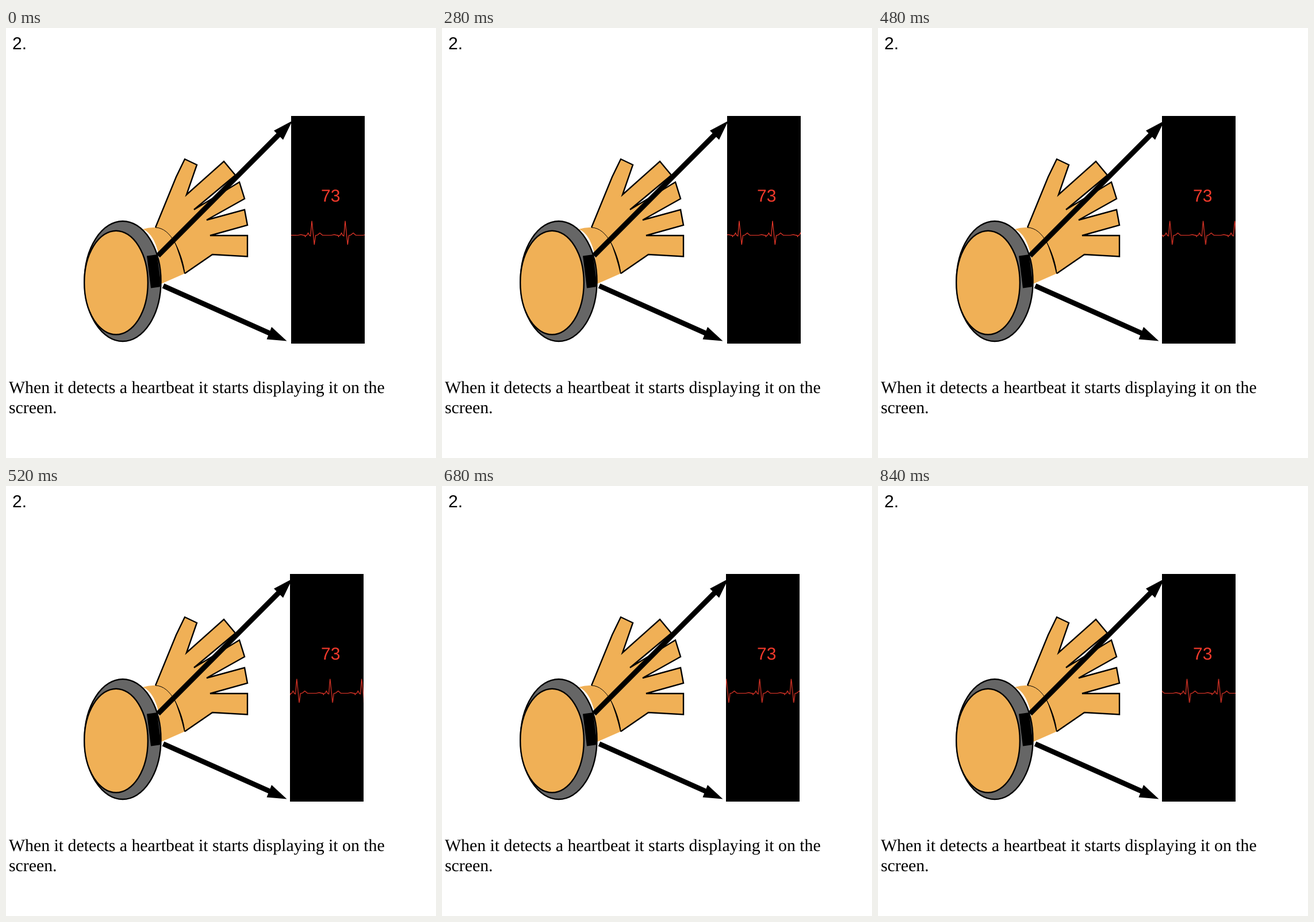
Animation, 748 px wide and 748 px high, one loop 880 ms. Source, as an HTML page:

```html
<!DOCTYPE html>
<html lang="en">
<head>
<meta charset="utf-8">
<title>Heartbeat display</title>
<style>
  html, body { margin: 0; width: 100%; height: 100%; overflow: hidden; background: #fff; }
  svg { display: block; width: 100vw; height: 100vh; }
  text { text-rendering: geometricPrecision; }
  .sans { font: 30px "Liberation Sans", Arial, sans-serif; }
  .serif { font: 29.8px "Liberation Serif", Times, serif; }
  .skin { fill: #f0b056; }
  .ink { stroke: #000; stroke-width: 2.4; }
  .red { fill: #f0392b; }
  .trace { fill: none; stroke: #f0392b; stroke-width: 1.2; }

  /* A tiny negative delay keeps the 40 ms steps clear of rounding. */
  .panel { animation: nudge 880ms -1ms step-end infinite; }
  .trace { animation: scroll 880ms -1ms step-end infinite; }

  @keyframes nudge {
    0% { transform: translateX(0); }
    54.5455% { transform: translateX(-2px); }
  }
  /* One unit (1.875px) per step, then two. */
  @keyframes scroll {
    0% { transform: translateX(0); }
    4.5455% { transform: translateX(-3.75px); animation-timing-function: steps(14); }
    68.1818% { transform: translateX(-30px); animation-timing-function: steps(7); }
    100% { transform: translateX(-56.25px); }
  }
</style>
</head>
<body>
<svg viewBox="0 0 748 748">
  <defs>
    <clipPath id="screen"><rect class="panel" x="496" y="153" width="128" height="396"/></clipPath>
    <path id="beat" d="M-28 360.5 H-24 L-19 359.3 L-14 360.7 L-12.5 360.5 L-11.5 363 L-10 360.5 H-8.5 L-6.5 356.5 L-4 361 L-2.3 361.8 L0 335.5 L4.3 377 L6.5 361 L10 360 L14 356.5 L18.5 360.5 H30"/>
  </defs>

  <text class="sans" x="11" y="37">2.</text>

  <g class="skin">
    <path d="M238 350 Q250 346.500 260 347 L290 350 L311 427 L270 445 L266 396 Q258 358 238 350Z"/>
    <path d="M260 347 L296 259 L311 228 L332 238 L314 290 L379 232 L399 256 L327 316 L406 268 L415 297 L349 334 L415 316 L420 343 L355 361 H420 V397.500 L359 394 L311 427 C304 388 288 348 260 347Z"/>
  </g>
  <path class="ink" fill="none" d="M260 347 L296 259 L311 228 L332 238 L314 290 L379 232 L399 256 L327 316 L406 268 L415 297 L349 334 L415 316 L420 343 L355 361 H420 V397.500 L359 394 L311 427"/>
  <path fill="none" stroke="#000" d="M311 427 C304 388 288 348 260 347"/>
  <path d="M311.500 428 Q309 400 291 367 Q303 396 310 427Z"/>

  <ellipse class="ink" cx="203" cy="440.500" rx="66.500" ry="104.500" fill="#666"/>
  <ellipse class="skin ink" cx="191.500" cy="443" rx="55.300" ry="90.300"/>
  <path d="M245 396.500 L263 394 L270 450 L252 452.500Z"/>

  <path stroke="#000" stroke-width="9" d="M264.500 396 L476 184 M273.500 448.500 L462 532.500"/>
  <path d="M498 161.500 L466 178.500 L482 194.500Z M488.500 544.500 L462 520 L453.500 541.500Z"/>

  <rect class="panel" x="496" y="153" width="128" height="396"/>
  <text class="sans red" x="548" y="301.500">73</text>
  <g clip-path="url(#screen)">
    <g class="trace">
      <path d="M490 360.500 H505"/>
      <use href="#beat" x="532"/>
      <use href="#beat" x="590"/>
      <use href="#beat" x="645"/>
      <path d="M672 360.500 H690"/>
    </g>
  </g>

  <g class="serif">
    <text x="5" y="635">When it detects a heartbeat it starts displaying it on the</text>
    <text x="5" y="670">screen.</text>
  </g>
</svg>
</body>
</html>
```
